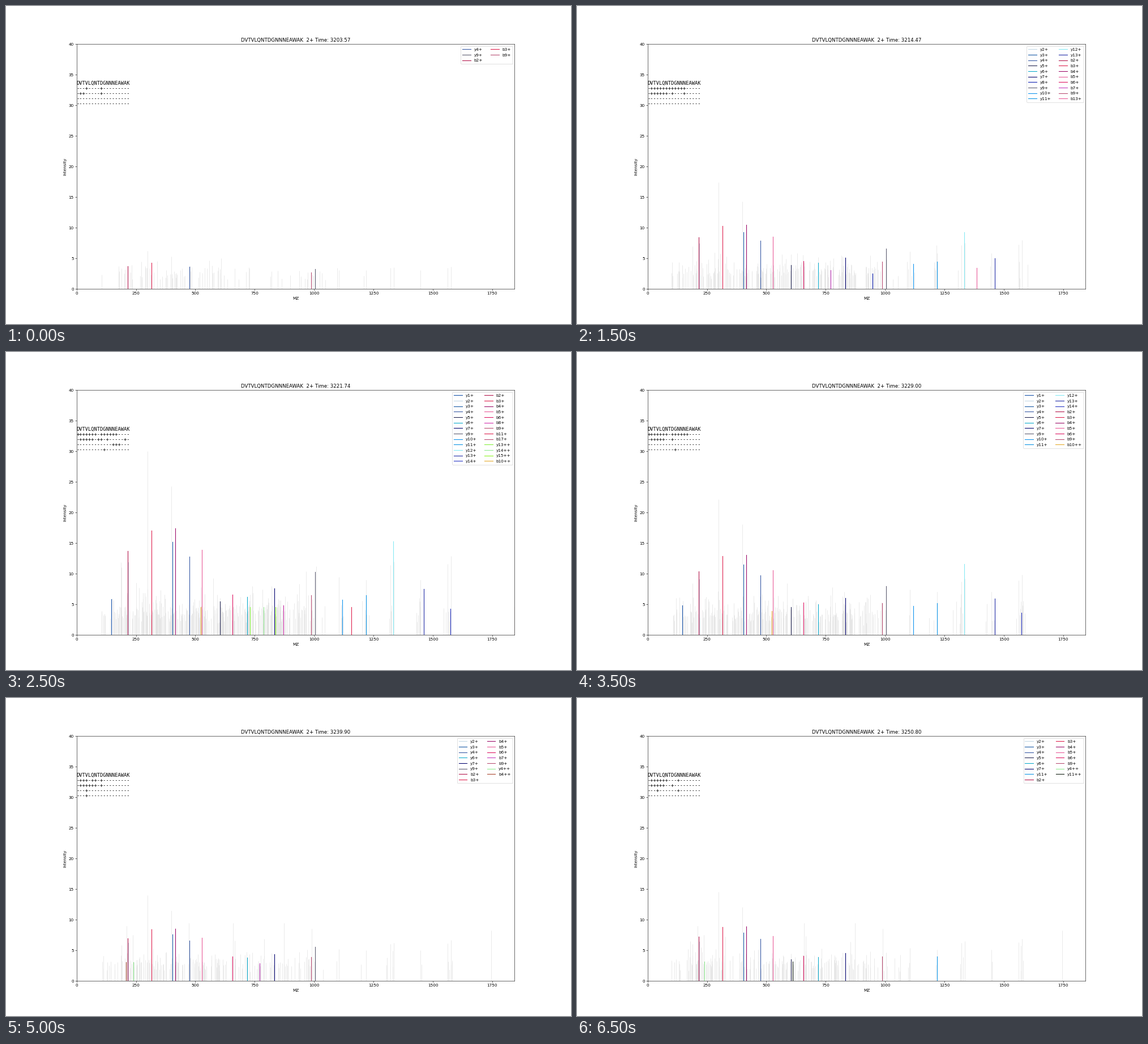
Recreate the animation shown at these times as a matplotlib script. Size 998x561 px, loop 7 s.

```python
import numpy as np
import matplotlib.pyplot as plt
from matplotlib.animation import FuncAnimation

W, H, DPI = 998, 561, 52
STEP = 500
PEPTIDE = "DVTVLQNTDGNNNEAWAK"
XMAX, YMAX = 1844, 40
PROTON, WATER = 1.00728, 18.01056
MASS = dict(D=115.027, V=99.068, T=101.048, L=113.084, Q=128.059, N=114.043,
            G=57.021, E=129.043, A=71.037, W=186.079, K=128.095)

# Fragments found in each scan, in legend order.
SCANS = [
    "y4 y9 b2-3 b9",
    "y1 y4 y9 b2-3 b9",
    "y2-4 y6-7 y9 y11 b2-5 b9",
    "y2-13 b2-7 b9 b13",
    "y1-14 b2-7 b9",
    "y1-7 y9-14 b2-6 b8-9 b11 b17 y13-15++ b10++",
    "y1-7 y9-14 b2-9 y13++ b10++",
    "y1-7 y9-14 b2-6 b9 b10++",
    "y1-7 y9-13 b2-7 b9",
    "y1-4 y6-9 y11-13 b2-4 y4++ y12++",
    "y2-4 y6-7 y9 b2-7 b9 y4++ b4++",
    "y2-7 y9 b2-7 b9 y4++",
    "y2-8 y11 b2-6 b9 y4++",
    "y2-7 y11 b2-6 b9 y4++ y11++",
]

# Height of each strong fragment when the peptide elutes most.
APEX = {"y": dict(enumerate([5.9, 11.9, 15.2, 12.8, 5.5, 6.2, 7.6, 3, 10.3,
                             5.8, 6.5, 15.3, 7.5, 4.3], 1)),
        "b": dict(enumerate([13.7, 17.1, 17.4, 13.9, 6.6, 4, 4.8, 6.5], 2))}
WEAK = 4.6

# One palette per series, repeated along the fragment number.
PALETTES = {
    "y+": ["#2634c4", "#1551a8", "#c2d8e6", "#1558a4", "#3558a3", "#20234f",
           "#0aa9cc", "#00006e", "#0a1cb0", "#5c5c70", "#0f93ee", "#0a92e4",
           "#84e9f4", "#1f2ba6"],
    "b+": ["#d12eac", "#b84c72", "#b3154a", "#de1f4c", "#9c0a68", "#e85a98",
           "#de1460", "#c437bd"],
    "y++": ["#8cf520", "#142014", "#b8d22c", "#84f03a", "#90ea90"],
    "b++": ["#a8452c", "#c8642c", "#e6aa2c", "#d08028"],
}

# Unassigned peaks: m/z and full height, with the peptide or just after it.
EARLY = {188: 11, 298.6: 30, 398.5: 24.3, 820: 8, 938: 8.4, 1004: 8,
         1104: 9.5, 1219: 9, 1321: 11.4, 1335: 12, 1448: 9, 1562: 11.6,
         1577: 12.9}
LATE = {210: 9, 237: 7.5, 658: 9.5, 873: 9.5, 991: 8.5, 1745: 8.3}
CLUSTERS = [1045, 1110, 1215, 1315, 1440, 1570]


def elution(n):
    return np.interp(n, [0, 3, 5, 7, 9, 13], [0.15, 0.55, 1, 0.72, 0.42, 0.45])


def height(apex, n):
    return 2 + (apex - 2) * elution(n)


def fragments(n):
    found = []
    for token in SCANS[n].split():
        charge = 2 if token.endswith("++") else 1
        ends = token[1:].rstrip("+").split("-")
        for k in range(int(ends[0]), int(ends[-1]) + 1):
            found.append((token[0], k, charge))
    return found


def mz(kind, k, charge):
    part = PEPTIDE[:k] if kind == "b" else PEPTIDE[-k:]
    total = sum(MASS[r] for r in part) + (WATER if kind == "y" else 0)
    return total / charge + PROTON


def background(n):
    rng = np.random.default_rng(40 + n)
    level = elution(n)
    count = int(400 * level ** 0.85)
    x = np.concatenate([
        rng.uniform(100, 210, count // 12),
        rng.uniform(200, 860, 3 * count // 4),
        rng.uniform(850, 1010, count // 9),
        rng.choice(CLUSTERS, count // 14) + rng.normal(0, 12, count // 14)])
    floor = 1.7 + 1.1 * level
    h = floor * rng.uniform(0.65, 1.4, x.size)
    h += rng.exponential(0.4 * floor, x.size)
    rise = np.clip((n - 7) / 2, 0, 1)
    steady = [height(a, n) for a in EARLY.values()]
    steady += [a * rise for a in LATE.values()]
    return np.r_[x, list(EARLY), list(LATE)], np.r_[h, steady]


def marks(found, kind, charge):
    return "".join("+" if (kind, i, charge) in found else "-"
                   for i in range(1, len(PEPTIDE) + 1))


# The small margin keeps the pixel size from being rounded down.
fig, ax = plt.subplots(figsize=((W + 0.001) / DPI, (H + 0.001) / DPI), dpi=DPI)


def draw(n):
    ax.clear()
    x, h = background(n)
    ax.vlines(x, 0, h, color="#e3e3e3", lw=1, zorder=1)
    found = fragments(n)
    for kind, k, charge in found:
        apex = APEX[kind].get(k, WEAK) if charge == 1 else WEAK
        palette = PALETTES[kind + "+" * charge]
        pos = mz(kind, k, charge)
        ax.plot([pos, pos], [0, height(apex, n)], lw=1.5, zorder=3,
                color=palette[k % len(palette)],
                label=f"{kind}{k}{'+' * charge}")
    rows = [PEPTIDE] + [marks(found, kind, charge)
                        for charge in (1, 2) for kind in "yb"]
    for i, row in enumerate(rows):
        ax.text(0, YMAX * (40 - i) / 48, row, size=12,
                family="DejaVu Sans Mono")
    ax.set(xlim=(0, XMAX), ylim=(0, YMAX), xlabel="MZ", ylabel="Intensity")
    ax.set_title(f"{PEPTIDE}  2+ Time: {3203.57 + 3.6334 * n:.2f}")
    ax.legend(loc="upper right", ncol=2)
    return []


anim = FuncAnimation(fig, draw, frames=len(SCANS), interval=STEP,
                     init_func=lambda: [], repeat=True, repeat_delay=0)
plt.show()
```
